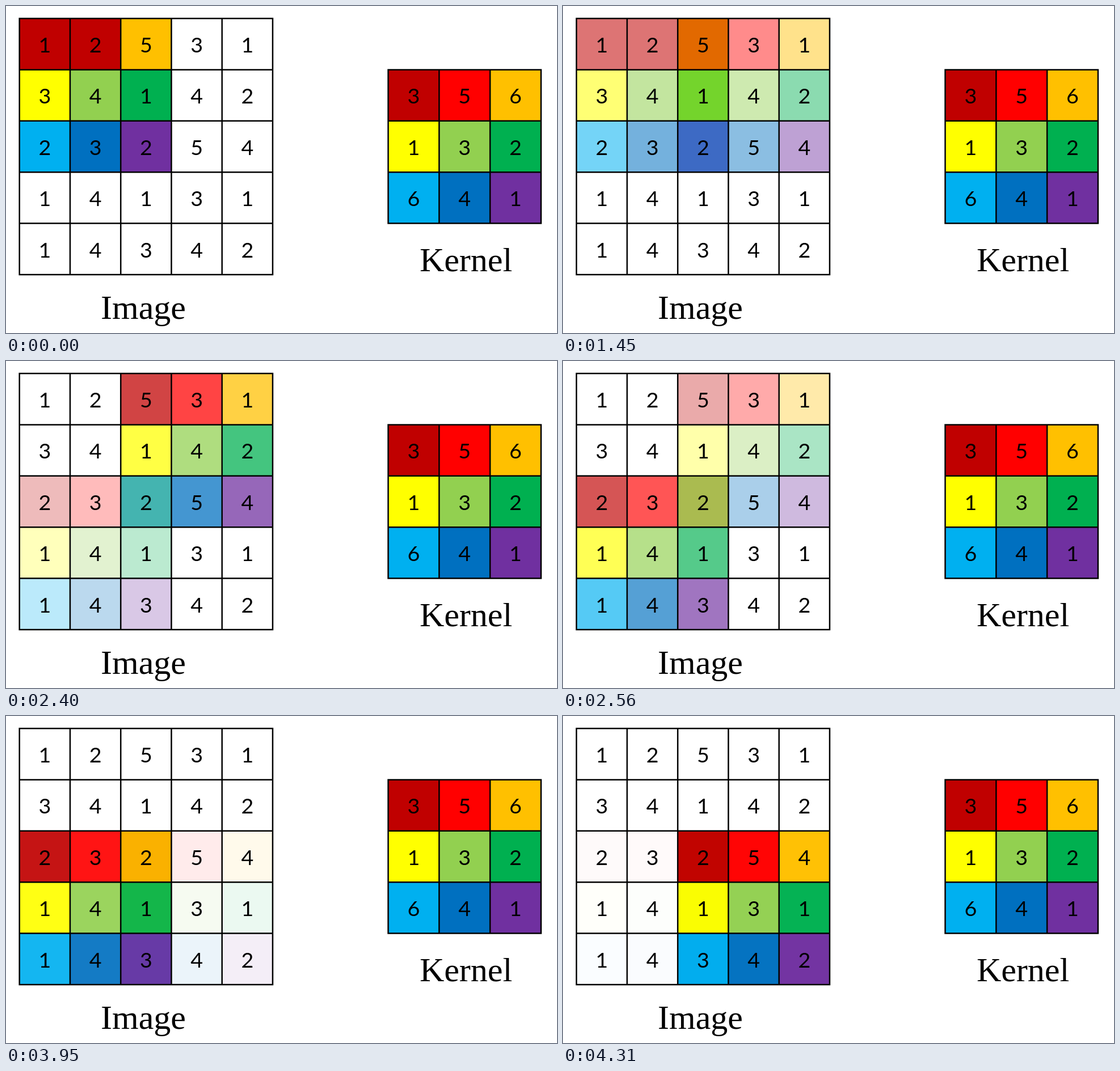
An HTML page for the animation above (6390 ms loop, 971x577 px).

```html
<!DOCTYPE html>
<html lang="en">
<head>
<meta charset="utf-8">
<title>Convolution with stride 2</title>
<style>
  html, body { margin: 0; width: 100%; height: 100%; overflow: hidden; background: #fff; }
  svg { display: block; width: 100%; height: 100%; }
  text { text-anchor: middle; fill: #000; }
  .digit { font: 37.6px Lato, Carlito, sans-serif; }
  .label { font: 60px "Liberation Serif", serif; }
  path { stroke: #000; stroke-width: 2.5; fill: none; }
</style>
</head>
<body>
<svg viewBox="0 0 971 577"></svg>
<script>
const svg = document.querySelector("svg");
const LOOP = 6390;
const WHITE = [255, 255, 255];
const DARK_RED = [192, 0, 0];
const COLORS = [
  DARK_RED, [255, 0, 0], [255, 192, 0],
  [255, 255, 0], [146, 208, 80], [0, 176, 80],
  [0, 176, 240], [0, 112, 192], [112, 48, 160]
];

// Each fade: start progress, speed, cap, and the moments it is redrawn
const FADES = [
  { from: 0.2, rate: 1 / 395, cap: 0.96, end: 2400,
    steps: [1340, 1380, 1440, 1490, 1540, 1590, 1640] },
  { from: 0.267, rate: 1 / 400, cap: 0.985, end: 2860,
    steps: [2400, 2440, 2500, 2560, 2640, 2700] },
  { from: 0.08, rate: 1 / 400, cap: 0.98, end: LOOP,
    steps: [3950, 4000, 4050, 4100, 4150, 4200, 4260, 4310] }
];
const WINDOWS = [[0, 0], [0, 2], [2, 0], [2, 2]];

function add(tag, attrs, text = "") {
  const el = document.createElementNS("http://www.w3.org/2000/svg", tag);
  for (const key in attrs) el.setAttribute(key, attrs[key]);
  el.textContent = text;
  svg.append(el);
  return el;
}

const css = c => `rgb(${c.map(Math.round)})`;

function grid(x, y, w, h, rows) {
  const n = rows.length;
  const cells = [];
  rows.forEach((row, r) => [...row].forEach((_, c) =>
    cells.push(add("rect", { x: x + c * w, y: y + r * h, width: w, height: h, fill: "#fff" }))));
  let d = "";
  for (let i = 0; i <= n; i++) {
    d += `M${x + i * w} ${y - 1.2}v${n * h + 2.4}M${x - 1.2} ${y + i * h}h${n * w + 2.4}`;
  }
  add("path", { d });
  rows.forEach((row, r) => [...row].forEach((digit, c) =>
    add("text", { class: "digit", x: x + (c + 0.5) * w, y: y + r * h + 60 }, digit)));
  return cells;
}

const image = grid(23.7, 22, 89.25, 90.4, ["12531", "34142", "23254", "14131", "14342"]);
const kernel = grid(673.5, 112.4, 89.8, 90.4, ["356", "132", "641"]);
kernel.forEach((cell, i) => cell.setAttribute("fill", css(COLORS[i])));
add("text", { class: "label", x: 242, y: 552 }, "Image");
add("text", { class: "label", x: 810.5, y: 468 }, "Kernel");

function colorAt(win, row, col) {
  const r = row - WINDOWS[win][0], c = col - WINDOWS[win][1];
  if (r < 0 || r > 2 || c < 0 || c > 2) return WHITE;
  // The first window shows two dark red cells
  return win === 0 && r === 0 && c === 1 ? DARK_RED : COLORS[r * 3 + c];
}

function state(t) {
  let win = 0;
  for (const { from, rate, cap, end, steps } of FADES) {
    if (t < steps[0]) break;
    if (t < end) {
      const step = steps.filter(s => s <= t).pop();
      return [win, Math.min(cap, from + (step - steps[0]) * rate)];
    }
    win++;
  }
  return [win, 0];
}

function draw(now) {
  const [win, p] = state(now % LOOP);
  image.forEach((cell, i) => {
    const row = Math.floor(i / 5), col = i % 5;
    const a = colorAt(win, row, col);
    const b = p ? colorAt(win + 1, row, col) : a;
    cell.setAttribute("fill", css(a.map((v, k) => v + (b[k] - v) * p)));
  });
}

const start = performance.now();
function tick() {
  draw(performance.now() - start);
  requestAnimationFrame(tick);
}
tick();
</script>
</body>
</html>
```
